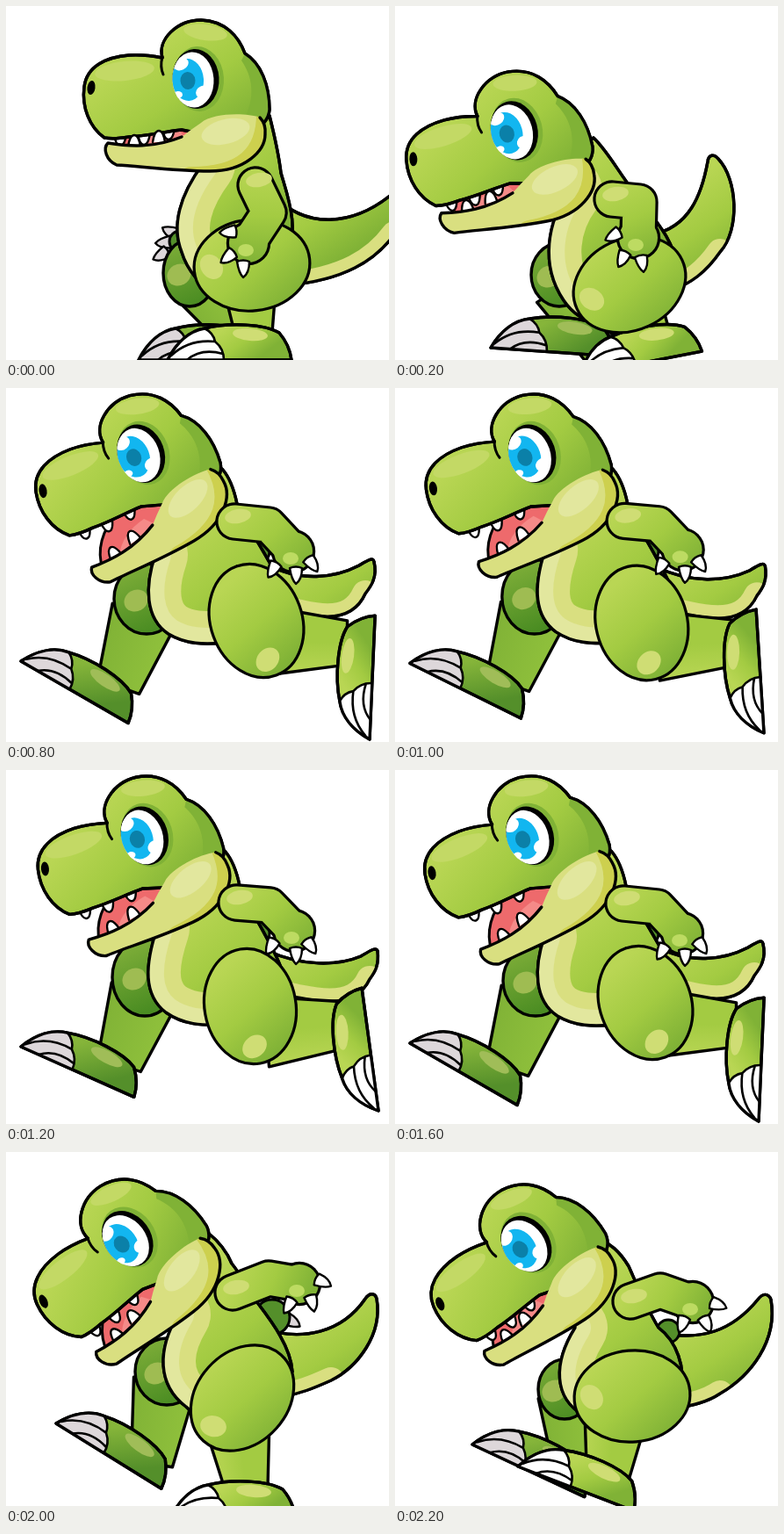
Write an HTML page with a canvas that moves like this. It is 436 px wide and 403 px high and loops after 2.4 s.

```html
<!DOCTYPE html>
<html lang="en">
<head>
<meta charset="utf-8">
<title>Running dinosaur</title>
<style>
html, body { margin: 0; width: 100%; height: 100%; overflow: hidden; background: #fff; }
canvas { display: block; }
</style>
</head>
<body>
<canvas id="stage" width="436" height="403"></canvas>
<script>
const ctx = document.getElementById('stage').getContext('2d');
const LIGHT = '#b9d654', GREEN = '#a3cb42', DARK = '#80b236', DEEP = '#548f2a';
const CREAM = '#d9df80', PALE = '#e2e79e', GOLD = '#cdd04e', SHINE = '#cfdd74';
const WHITE = '#fff', GREY = '#ddd7da';

// head, jaw, foot: x, y, angle. thigh: x, y, angle. shin: x1, y1, x2, y2, width.
// arm: shoulder, elbow, hand. claws: x, y, angle for each.
const stand = {
  head: [215, 84, 0], jaw: [262, 150, 0],
  tail: 'M305,215 C340,254 395,252 442,212 C460,225 460,250 442,260 C420,290 385,312 320,318Z',
  body: 'M224,180 C198,215 188,250 200,280 C206,300 220,318 245,335 L320,300 C335,250 320,215 313,190 C310,165 305,145 300,125 L240,140Z',
  thigh: [280, 295, -6], shin: [278, 325, 283, 385, 58], foot: [184, 403, 0],
  farThigh: [209, 304, 30, 38], farShin: [212, 318, 262, 380, 48], farFoot: [151, 403, 0],
  arm: [284, 204, 299, 235, 276, 270],
  claws: [254, 257, 175, 253, 285, 140, 270, 298, 90],
  farHand: [198, 268, 12], farClaws: [188, 257, 205, 181, 269, 175, 177, 283, 150]
};
const crouch = {
  head: [138, 133, -11], jaw: [198, 192, -11],
  tail: 'M296,250 C338,242 352,205 359,167 C360,159 366,158 371,164 C393,187 396,245 373,270 C357,293 340,306 315,315Z',
  body: 'M202,200 C176,235 168,285 195,325 C205,340 220,350 240,355 L325,290 C320,250 290,225 274,200 C258,180 245,155 229,140 L185,170Z',
  thigh: [270, 307, -25], shin: [272, 335, 298, 385, 72], foot: [211, 420, -11],
  farThigh: [190, 296, 32, 36], farShin: [188, 312, 236, 385, 56], farFoot: [109, 389, 4],
  arm: [250, 210, 281, 213, 280, 254],
  claws: [252, 251, 150, 262, 277, 115, 284, 282, 80],
  farHand: [250, 250, 10], farClaws: []
};
const stretch = {
  head: [153, 76, -16], jaw: [221, 126, -30],
  tail: 'M296,200 C335,222 375,216 402,202 C412,196 418,192 419,198 C423,215 416,225 409,234 C392,272 350,262 295,245Z',
  body: 'M170,190 C158,225 158,262 185,280 C205,292 225,292 250,290 L325,255 C315,215 280,170 263,132 C259,112 253,100 246,92 L200,120Z',
  thigh: [285, 265, -110], shin: [305, 288, 388, 290, 76], foot: [414, 400, -87.5],
  farThigh: [160, 240, 37, 40], farShin: [157, 258, 128, 340, 76], farFoot: [17, 311, 30],
  arm: [260, 152, 299, 156, 327, 186],
  claws: [304, 206, 120, 330, 212, 90, 348, 200, 55],
  farHand: [286, 186, 14], farClaws: []
};
const reach = {
  head: [157, 76, -13.6], jaw: [224, 126, -25],
  tail: 'M298,206 C338,224 378,223 404,212 C414,206 421,201 423,206 C425,222 420,230 414,238 C396,276 350,264 295,250Z',
  body: 'M172,180 C158,222 156,256 182,276 C202,290 222,291 250,290 L322,255 C316,215 282,170 266,132 C262,112 256,100 249,92 L200,120Z',
  thigh: [278, 269, -100], shin: [296, 298, 386, 290, 80], foot: [424, 388, -97.7],
  farThigh: [158, 236, 37, 44], farShin: [157, 255, 129, 335, 78], farFoot: [17, 315, 24],
  arm: [262, 151, 300, 154, 328, 183],
  claws: [302, 200, 120, 330, 210, 90, 346, 200, 55],
  farHand: [286, 186, 14], farClaws: []
};
const land = {
  head: [138, 100, -32], jaw: [214, 133, -38],
  tail: 'M288,200 C338,217 383,205 409,167 C414,160 420,160 422,167 C429,208 400,245 370,260 C350,269 335,275 310,280Z',
  body: 'M196,185 C172,225 172,265 205,290 C215,300 230,310 250,315 L326,250 C324,220 300,190 285,170 C274,155 268,140 257,127 C250,110 240,100 230,92 L190,120Z',
  thigh: [269, 280, -48], shin: [265, 320, 275, 390, 70], foot: [188, 415, 0],
  farThigh: [183, 250, 36, 38], farShin: [181, 262, 166, 355, 72], farFoot: [57, 309, 31.8],
  arm: [258, 160, 299, 144, 334, 150],
  claws: [322, 174, 120, 348, 171, 75, 360, 148, 25],
  farHand: [303, 188, 20], farClaws: [325, 193, 30]
};
const gather = {
  head: [149, 106, -30], jaw: [221, 142, -33],
  tail: 'M292,204 C350,218 385,202 413,168 C418,161 425,160 428,168 C436,215 405,255 370,275 C355,285 340,288 318,292Z',
  body: 'M205,200 C180,240 180,280 215,300 C225,305 235,308 250,310 L325,275 C332,245 320,215 300,200 C285,175 275,150 266,130 C255,112 245,105 235,100 L200,130Z',
  thigh: [270, 278, -5], shin: [250, 310, 241, 380, 68], foot: [140, 358, 21],
  farThigh: [193, 270, 30, 34], farShin: [192, 278, 200, 360, 58], farFoot: [88, 333, 25],
  arm: [268, 170, 302, 158, 339, 171],
  claws: [327, 195, 110, 354, 195, 65, 367, 174, 20],
  farHand: [311, 204, 13], farClaws: []
};

function mix(a, b, t) {
  if (typeof a === 'number') return a + (b - a) * t;
  if (typeof a === 'string') {
    const ends = b.match(/-?[\d.]+/g), starts = a.match(/-?[\d.]+/g);
    if (ends.length !== starts.length) return t < .5 ? a : b;
    let i = 0;
    return a.replace(/-?[\d.]+/g, n => mix(+n, +ends[i++], t));
  }
  if (Array.isArray(a)) return a.length === b.length ? a.map((v, i) => mix(v, b[i], t)) : a;
  return Object.fromEntries(Object.keys(a).map(k => [k, mix(a[k], b[k], t)]));
}

// Moves everything above the ankles.
function sink(pose, dx, dy) {
  return { ...pose, shift: [dx, dy] };
}

const poses = [
  stand, sink(crouch, -3, 10), sink(crouch, -4, 9), crouch,
  stretch, mix(stretch, reach, .6), reach, mix(reach, stretch, .4),
  stretch, mix(stretch, land, .35), land, gather
];

function shape(path, fill, line = 3.4) {
  const p = typeof path === 'string' ? new Path2D(path) : path;
  if (fill) { ctx.fillStyle = fill; ctx.fill(p); }
  if (line) { ctx.lineWidth = line; ctx.strokeStyle = '#000'; ctx.stroke(p); }
  return p;
}
function oval(x, y, rx, ry, deg, fill, line = 0) {
  const p = new Path2D();
  p.ellipse(x, y, rx, ry, deg * Math.PI / 180, 0, 7);
  return shape(p, fill, line);
}
function ramp(x1, y1, x2, y2, a = LIGHT, b = DARK) {
  const g = ctx.createLinearGradient(x1, y1, x2, y2);
  g.addColorStop(0, a);
  if (a === LIGHT) g.addColorStop(.5, GREEN);
  g.addColorStop(1, b);
  return g;
}
function place([x, y, deg], px, py, draw) {
  ctx.save();
  ctx.translate(x, y);
  ctx.rotate(deg * Math.PI / 180);
  ctx.translate(-px, -py);
  draw();
  ctx.restore();
}
function inside(path, draw) {
  ctx.save();
  ctx.clip(path);
  draw();
  ctx.restore();
}
function band(path, color, width) {
  ctx.strokeStyle = color;
  ctx.lineWidth = width;
  ctx.stroke(new Path2D(path));
}

function drawClaws(list, fill) {
  for (let i = 0; i < list.length; i += 3) {
    place(list.slice(i, i + 3), 0, 0, () =>
      shape('M-7,-7 Q6,-7 11,0 Q6,5 -7,7 Q-10,0 -7,-7Z', fill, 2.4));
  }
}
function drawTail(path) {
  const p = shape(path, ramp(320, 200, 380, 290));
  // The lower edge is the last curve of the outline.
  const n = path.match(/-?[\d.]+/g);
  inside(p, () => band(`M${n.slice(-8, -6)} C${n.slice(-6)}`, CREAM, 30));
  shape(p, null);
}
function drawBody(path) {
  const p = shape(path, ramp(220, 150, 310, 260));
  // The belly follows the front edge, which ends at the first straight line.
  const front = path.split('L')[0];
  inside(p, () => {
    band(front, CREAM, 74);
    band(front, PALE, 36);
  });
  shape(p, null);
}
function drawShin([x1, y1, x2, y2, w], a, b) {
  const len = Math.hypot(x2 - x1, y2 - y1);
  const nx = (y1 - y2) / len * w / 2, ny = (x2 - x1) / len * w / 2;
  const taper = .66;
  shape(`M${x1 + nx},${y1 + ny} L${x2 + nx * taper},${y2 + ny * taper}
    L${x2 - nx * taper},${y2 - ny * taper} L${x1 - nx},${y1 - ny}Z`,
    ramp(x1 + nx, y1 + ny, x1 - nx, y1 - ny, a, b));
}
function drawFoot(at, claw, a, b, shine) {
  place(at, 0, 0, () => {
    const p = shape('M0,0 C10,-20 25,-33 42,-36 C70,-43 110,-41 127,-31 Q139,-17 141,0Z', ramp(70, -40, 100, 0, a, b));
    inside(p, () => oval(94, -29, 20, 7, 5, shine));
    shape('M0,0 C10,-20 25,-33 42,-36 Q52,-31 54,-21 Q64,-13 64,0Z', claw, 0);
    shape('M42,-36 Q52,-31 54,-21 Q64,-13 64,0 M4,-5 Q24,-24 54,-21 M22,0 Q38,-14 63,-7', null, 2.6);
    shape(p, null);
  });
}
function drawThigh([x, y, deg]) {
  const p = oval(x, y, 66, 52, deg, ramp(x - 35, y - 40, x + 40, y + 45), 3.2);
  inside(p, () => place([x, y, deg], 0, 0, () => oval(-46, -3, 15, 12, 60, SHINE)));
}
function drawArm([x1, y1, x2, y2, x3, y3]) {
  const path = new Path2D(`M${x1},${y1} L${x2},${y2} L${x3},${y3}`);
  const layer = (grow, color) => {
    ctx.lineWidth = 37 + grow * 2;
    ctx.strokeStyle = color;
    ctx.stroke(path);
    oval(x3, y3, 22 + grow, 22 + grow, 0, color);
  };
  layer(3.2, '#000');
  layer(0, ramp(x1, y1 - 20, x3 + 8, y3 + 24));
  oval(x1 + 4, y1 - 6, 15, 8, -10, SHINE);
  oval(x3 - 3, y3 + 8, 9, 7, 0, '#bddb62');
}
function drawMouth() {
  shape('M126,164 C130,142 148,125 170,118 L245,126 L205,158Z', '#ee6a6c', 3);
  shape('M150,160 Q165,140 195,138 L205,152Z', '#f58a88', 0);
}
function drawHead() {
  const p = shape('M112,150 C95,138 86,115 89,92 C92,68 115,58 140,56 C155,55 168,57 178,59 ' +
    'C172,38 195,16 222,16 C250,17 265,35 272,54 C290,65 300,90 300,118 C298,140 270,150 240,149 ' +
    'L200,141 C180,143 160,148 140,149 Q122,152 112,150Z', ramp(150, 55, 225, 165));
  inside(p, () => {
    oval(135, 74, 34, 11, -6, '#c3d965');
    oval(227, 30, 25, 9, 8, '#c3d965');
    shape('M272,54 C296,68 304,100 300,130 L266,136 C283,112 284,85 268,62Z', DARK, 0);
  });
  shape(p, null);
  shape('M178,58 Q175,69 179,78', null, 3);
  oval(97, 93, 4.5, 8, 8, '#000');
  oval(219, 83, 29, 37, -4, DARK);
  oval(216, 83, 26.5, 34, -4, '#000');
  const eye = oval(213, 84, 23.5, 31.5, -4, WHITE);
  inside(eye, () => {
    oval(207, 84, 18, 24, -4, '#12b6f0');
    oval(207, 85, 8.5, 10, -4, '#0b80a8');
    oval(199, 66, 9, 7, -25, WHITE);
    oval(224, 98, 8, 7, -25, WHITE);
    oval(196, 101, 5, 4, 0, WHITE);
  });
}
function drawJaw() {
  const edge = 'M200,149 C168,162 140,160 116,156 C110,162 114,176 126,181 C150,182 190,188 232,188 ' +
    'C272,188 295,165 295,146 Q296,134 289,127';
  const p = shape(edge + ' C272,121 235,122 222,133 Q210,141 200,149Z', CREAM, 0);
  inside(p, () => {
    band('M210,195 C270,195 298,170 297,120', GOLD, 24);
    oval(250, 143, 28, 14, -14, PALE);
  });
  shape(edge, null);
}
function drawTeeth(teeth, dir) {
  for (const [x, y] of teeth) {
    shape(`M${x - 7},${y - dir * 13} Q${x - 5},${y} ${x},${y} Q${x + 5},${y} ${x + 7},${y - dir * 13}`, WHITE, 2.4);
  }
}

function drawPose(p) {
  const [dx, dy] = p.shift || [0, 0];
  const upper = draw => { ctx.save(); ctx.translate(dx, dy); draw(); ctx.restore(); };
  const [fx, fy, frx, fry] = p.farThigh;
  const [hx, hy, hr] = p.farHand;
  ctx.clearRect(0, 0, 436, 403);
  ctx.lineJoin = ctx.lineCap = 'round';
  upper(() => {
    drawTail(p.tail);
    drawClaws(p.farClaws, GREY);
    oval(hx, hy, hr, hr, 0, DEEP, 3);
    drawShin(p.farShin, DARK, '#90c13c');
  });
  drawFoot(p.farFoot, GREY, '#86b53a', DEEP, '#a0bd58');
  upper(() => {
    const far = oval(fx, fy, frx, fry, 0, ramp(fx - 20, fy - 35, fx + 10, fy + 35, '#7dad38', '#4a8c22'), 3.4);
    inside(far, () => oval(fx - 12, fy + 2, 14, 12, -30, '#9fbc52'));
    drawShin(p.shin, LIGHT, GREEN);
    drawBody(p.body);
  });
  drawFoot(p.foot, WHITE, LIGHT, DARK, SHINE);
  upper(() => {
    drawThigh(p.thigh);
    place(p.jaw, 262, 150, drawMouth);
    place(p.head, 215, 84, () => {
      drawTeeth([[130, 159], [157, 158], [185, 152]], 1);
      drawHead();
    });
    place(p.jaw, 262, 150, () => {
      drawTeeth([[146, 147], [174, 142]], -1);
      drawJaw();
    });
    drawArm(p.arm);
    drawClaws(p.claws, WHITE);
  });
}

function tick() {
  drawPose(poses[Math.floor(performance.now() % 2400 / 200)]);
  requestAnimationFrame(tick);
}
tick();
</script>
</body>
</html>
```
